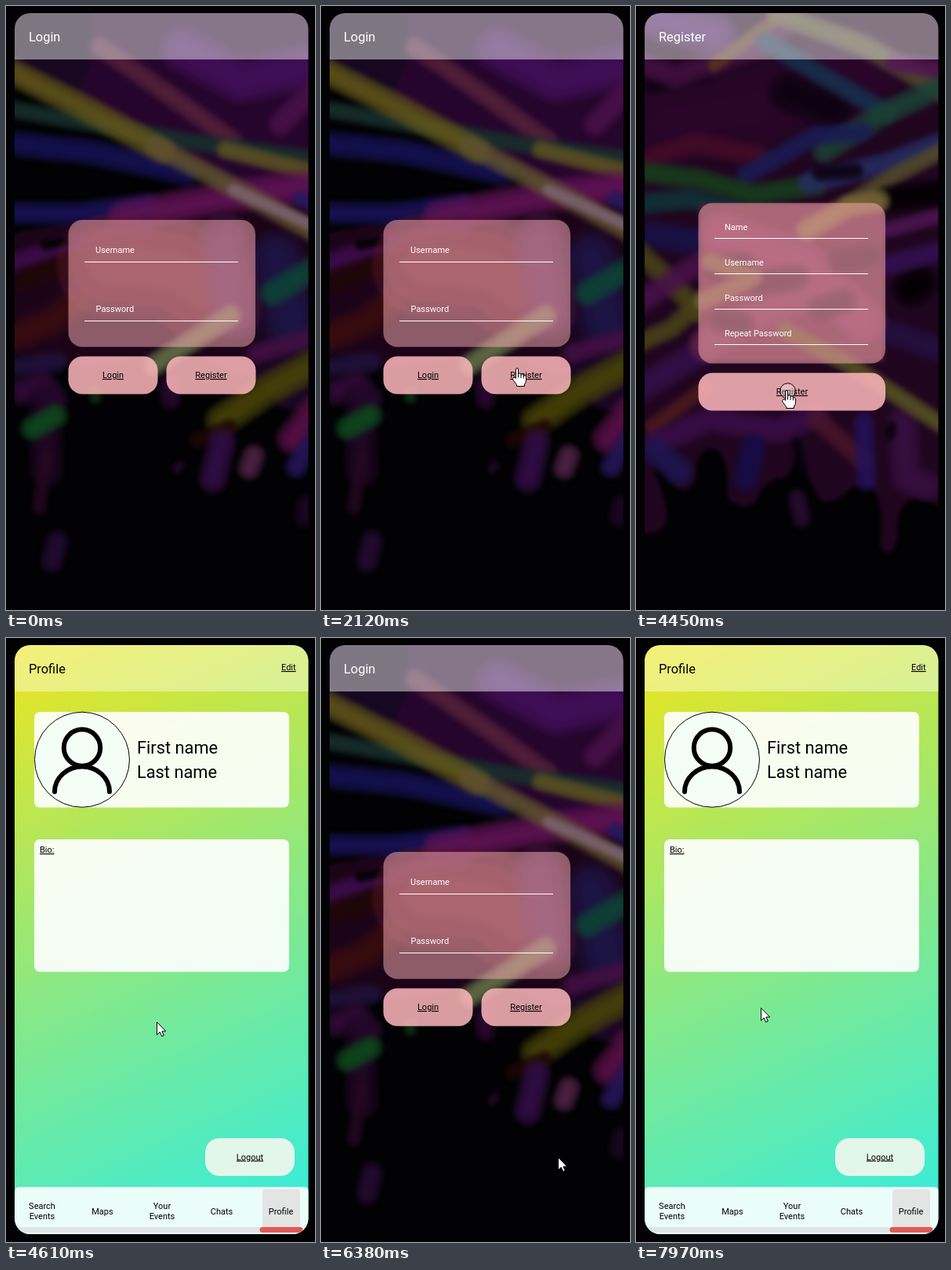
An HTML page that plays this animation: 394x768 px, repeating every 8000 ms.

```html
<!DOCTYPE html>
<html lang="en">
<head>
<meta charset="utf-8">
<title>App prototype</title>
<style>
  html, body { margin: 0; width: 100%; height: 100%; overflow: hidden; background: #020204; }
  svg { position: fixed; inset: 0; width: 100%; height: 100%; font: 11px Roboto, sans-serif; }
  .sky { position: fixed; }
  .paint { fill: none; stroke-linecap: round; stroke-linejoin: round; filter: url(#soft); }
  .title { font-size: 16.4px; }
  .dark { fill: #fff; }
  .glass { fill: #ffb2b8; fill-opacity: .5; }
  .button { fill: #ffb9be; fill-opacity: .85; }
  .header { fill: #fff; fill-opacity: .45; }
  .panel { fill: #fff; fill-opacity: .91; }
  .link { fill: #000; text-decoration: underline; }
  .mid { text-anchor: middle; }
  .rule { stroke: #fff; }
  .cursor { fill: #fff; stroke: #000; stroke-linejoin: round; }
</style>
</head>
<body>
<svg viewBox="0 0 394 768">
  <defs>
    <clipPath id="phone"><rect x="11" y="9" width="374.5" height="749" rx="20"/></clipPath>
    <filter id="soft" filterUnits="userSpaceOnUse" x="-20" y="-20" width="440" height="800" color-interpolation-filters="sRGB">
      <feGaussianBlur stdDeviation="2.6"/>
    </filter>
    <linearGradient id="lime" gradientUnits="userSpaceOnUse" x1="22" y1="-5" x2="374" y2="772">
      <stop stop-color="#efe51c"/><stop offset=".5" stop-color="#8ae884"/><stop offset="1" stop-color="#2fede4"/>
    </linearGradient>
  </defs>

  <g id="login" clip-path="url(#phone)">
    <g class="paint">
      <path fill="#25052b" d="M70 0H394V262L300 235L180 165L60 95Z"/>
      <path fill="#170720" d="M0 0H110V70L90 110L0 72Z"/>
      <path fill="#1c0418" d="M0 290L200 255L394 225V450L300 470L230 440L90 460L0 440Z"/>
      <path fill="#190622" d="M318 400L394 370V520L350 510L318 470Z"/>
      <path stroke="#42105a" stroke-width="46" d="M225 55L300 95L394 75"/>
      <path stroke="#4a1149" stroke-width="26" d="M350 150L394 105"/>
      <path stroke="#54203a" stroke-width="22" d="M120 52L215 118L290 172"/>
      <path stroke="#171154" stroke-width="28" d="M0 174L110 186L230 212"/>
      <path stroke="#18302c" stroke-width="20" d="M0 130L90 146L230 172L394 195"/>
      <path stroke="#5c5022" stroke-width="20" d="M280 183L394 212"/>
      <path stroke="#1b1258" stroke-width="24" d="M0 263L90 264L180 252"/>
      <path stroke="#5f1354" stroke-width="34" d="M150 268L270 244L394 228"/>
      <path stroke="#3c0c4c" stroke-width="22" d="M0 330L80 302L180 280"/>
      <path stroke="#62551c" stroke-width="28" d="M0 80L100 130L200 184"/>
      <path stroke="#605030" stroke-width="23" d="M190 178L300 236L394 288"/>
      <path stroke="#7b6170" stroke-width="14" d="M290 234L394 280"/>
      <path stroke="#1c1648" stroke-width="54" d="M345 320L365 405"/>
      <path stroke="#261a60" stroke-width="18" d="M375 245L394 255"/>
      <path stroke="#0d4436" stroke-width="28" d="M340 365L394 333"/>
      <path stroke="#390c10" stroke-width="32" d="M0 425L60 400L90 375"/>
      <path stroke="#210708" stroke-width="26" d="M20 350L75 330"/>
      <path stroke="#000" stroke-width="12" d="M50 304L78 298"/>
      <path stroke="#5c1b28" stroke-width="100" d="M130 330L210 335L250 360"/>
      <path stroke="#4a204e" stroke-width="54" d="M280 300L290 390"/>
      <path stroke="#65704a" stroke-width="24" d="M190 456L286 394"/>
      <path stroke="#22123c" stroke-width="22" d="M0 460L65 453"/>
      <path stroke="#421043" stroke-width="22" d="M320 442L394 420"/>
      <path stroke="#484308" stroke-width="34" d="M275 527L330 490L394 455"/>
      <path stroke="#310b39" stroke-width="30" d="M20 490L45 480L60 500"/>
      <path stroke="#220727" stroke-width="34" d="M50 500L52 590"/>
      <path stroke="#240820" stroke-width="16" d="M52 570L42 638"/>
      <path stroke="#0d4a1c" stroke-width="26" d="M34 537L63 521"/>
      <path stroke="#103014" stroke-width="14" d="M114 490V498"/>
      <path stroke="#2b0830" stroke-width="22" d="M208 480L210 500"/>
      <path stroke="#1e0805" stroke-width="18" d="M245 552L285 535"/>
      <path stroke="#350d48" stroke-width="30" d="M275 555L264 601"/>
      <path stroke="#512348" stroke-width="24" d="M316 572L310 588"/>
      <path stroke="#5a1048" stroke-width="34" d="M366 550L394 515"/>
      <path stroke="#25165a" stroke-width="24" d="M370 586L394 550"/>
      <path stroke="#240929" stroke-width="10" d="M222 584L218 589"/>
      <path stroke="#250b32" stroke-width="24" d="M65 681L59 706"/>
      <path stroke="#1c0824" stroke-width="22" d="M383 635L381 650"/>
    </g>
    <rect class="header" width="394" height="68"/>
    <text class="title dark" x="29" y="45">Login</text>
    <rect class="glass" x="79.5" y="272" width="238.5" height="161.500" rx="18"/>
    <path class="rule" d="M100 325.500H296M100 400.500H296"/>
    <text class="dark" x="114" y="314">Username</text>
    <text class="dark" x="114.500" y="389">Password</text>
    <rect class="button" x="79.500" y="445.500" width="114" height="48" rx="18"/>
    <rect class="button" x="204.500" y="445.500" width="114" height="48" rx="18"/>
    <text class="link mid" x="136.500" y="473">Login</text>
    <text class="link mid" x="261.500" y="473">Register</text>
  </g>

  <g id="register" clip-path="url(#phone)">
    <g class="paint">
      <path fill="#20051f" d="M0 0H394V640Q370 625 350 628Q332 632 333 680Q322 708 311 685Q318 635 300 610Q285 606 272 615Q252 635 236 629Q218 600 205 560Q200 605 180 600Q160 608 152 632Q130 645 116 622Q120 565 95 563Q75 565 77 600Q68 622 52 613Q30 585 20 585Q45 640 37 660Q25 675 0 668Z"/>
      <path stroke="#2a062b" stroke-width="80" d="M40 150L150 130L290 80"/>
      <path stroke="#0b0310" stroke-width="44" d="M195 110L250 130"/>
      <path stroke="#0e0314" stroke-width="20" d="M20 100L90 85"/>
      <path stroke="#42103f" stroke-width="26" d="M0 70L50 90L160 50L200 15"/>
      <path stroke="#4c1b62" stroke-width="44" d="M20 15L100 35"/>
      <path stroke="#58321e" stroke-width="16" d="M100 75L180 15"/>
      <path stroke="#16304b" stroke-width="22" d="M165 45L240 90L320 136"/>
      <path stroke="#544c2e" stroke-width="24" d="M180 10L290 50L394 110"/>
      <path stroke="#531653" stroke-width="22" d="M330 72L394 82"/>
      <path stroke="#1c4134" stroke-width="26" d="M240 185L310 140L394 100"/>
      <path stroke="#430b27" stroke-width="24" d="M0 200L75 174L155 190"/>
      <path stroke="#1a1c54" stroke-width="22" d="M140 215L230 165L290 160"/>
      <path stroke="#173d1d" stroke-width="24" d="M0 210L80 220L150 240L230 228"/>
      <path stroke="#103338" stroke-width="24" d="M0 252L70 245L130 262"/>
      <path stroke="#252c62" stroke-width="24" d="M220 225L320 200L394 172"/>
      <path stroke="#514a2a" stroke-width="20" d="M270 252L330 215L394 182"/>
      <path stroke="#0b0312" stroke-width="18" d="M235 213L280 210"/>
      <path stroke="#000" stroke-width="30" d="M322 246L394 236"/>
      <path stroke="#4b1450" stroke-width="18" d="M320 285L394 265"/>
      <path stroke="#171347" stroke-width="30" d="M20 290L80 300"/>
      <path stroke="#474216" stroke-width="24" d="M0 310L35 342L82 390"/>
      <path stroke="#471249" stroke-width="26" d="M0 380L60 340L130 300"/>
      <path stroke="#000" stroke-width="38" d="M350 360L362 352"/>
      <path stroke="#331052" stroke-width="24" d="M318 330L394 310"/>
      <path stroke="#230f40" stroke-width="28" d="M325 415L394 440"/>
      <path stroke="#494117" stroke-width="22" d="M0 430L45 410L90 370"/>
      <path stroke="#33104a" stroke-width="30" d="M0 490L65 450L120 420"/>
      <path stroke="#4c191d" stroke-width="18" d="M20 535L90 485"/>
      <path stroke="#3a0d46" stroke-width="28" d="M25 555L95 525L180 540L230 520"/>
      <path stroke="#1d1651" stroke-width="30" d="M25 565L55 592"/>
      <path stroke="#160d49" stroke-width="28" d="M150 560L140 600"/>
      <path stroke="#47152a" stroke-width="22" d="M230 525L290 578"/>
      <path stroke="#231259" stroke-width="22" d="M290 530L294 604"/>
      <path stroke="#371040" stroke-width="32" d="M340 530L345 600L370 610"/>
      <path stroke="#2a0c30" stroke-width="20" d="M206 626L211 652"/>
      <path stroke="#090310" stroke-width="12" d="M326 535L324 546M205 555L212 590"/>
      <path fill="#541c38" d="M82 252H316V452H82Z"/>
      <path stroke="#752b58" stroke-width="46" d="M110 290L210 325L290 400"/>
      <path stroke="#6c284e" stroke-width="36" d="M90 430L150 395L235 360"/>
      <path stroke="#32172c" stroke-width="28" d="M105 335L135 328M160 352L205 345M260 325L300 318M110 400L135 405M235 385L265 375"/>
      <path stroke="#7a6936" stroke-width="24" d="M218 285L270 255L310 248"/>
      <path stroke="#6d5b35" stroke-width="20" d="M85 375L150 345L95 325"/>
      <path stroke="#555021" stroke-width="20" d="M190 412L270 455L394 535"/>
    </g>
    <rect class="header" width="394" height="68"/>
    <text class="title dark" x="29" y="45">Register</text>
    <rect class="glass" x="79.500" y="250.500" width="238.500" height="204" rx="18"/>
    <path class="rule" d="M100 295.500H296M100 340.500H296M100 385.500H296M100 430.500H296"/>
    <g class="dark">
      <text x="113" y="285">Name</text>
      <text x="113" y="330">Username</text>
      <text x="113" y="375">Password</text>
      <text x="113" y="420">Repeat Password</text>
    </g>
    <rect class="button" x="79.500" y="466.500" width="238.500" height="48" rx="18"/>
    <text class="link mid" x="199" y="494">Register</text>
  </g>

  <g id="profile" clip-path="url(#phone)">
    <rect width="394" height="768" fill="url(#lime)"/>
    <rect width="394" height="68" fill="#fff" fill-opacity=".4"/>
    <text class="title" x="29" y="45">Profile</text>
    <text class="link" x="351" y="41">Edit</text>
    <rect class="panel" x="36" y="94" width="325" height="121.500" rx="7"/>
    <g fill="none" stroke="#000" stroke-linecap="round">
      <circle cx="97" cy="154.700" r="60.500" fill="#f4fdf5"/>
      <g stroke-width="6">
        <circle cx="97" cy="139.500" r="23.200"/>
        <path d="M62 195.500A35 32 0 0 1 132 195.500"/>
      </g>
    </g>
    <g font-size="21.800">
      <text x="167" y="147">First name</text>
      <text x="167" y="178">Last name</text>
    </g>
    <rect class="panel" x="36" y="256" width="325" height="168.500" rx="7"/>
    <text class="link" x="43" y="273">Bio:</text>
    <rect x="254" y="636" width="114" height="48" rx="18" fill="#e3f6ea"/>
    <text class="link mid" x="311" y="663.500">Logout</text>
    <path d="M11 758V704Q11 698 17 698H380Q386 698 386 704V758Z" fill="#ebfdf9"/>
    <rect x="327" y="701" width="48" height="52" rx="4" fill="#e3e5e5"/>
    <rect x="15" y="749" width="363" height="7" rx="3.500" fill="#dfe5e3"/>
    <rect x="323.500" y="749" width="55" height="7" rx="3.500" fill="#e05a55"/>
    <g class="mid">
      <text x="46" y="726">Search</text><text x="46" y="739">Events</text>
      <text x="123" y="733">Maps</text>
      <text x="199" y="726">Your</text><text x="199" y="739">Events</text>
      <text x="275" y="733">Chats</text>
      <text x="350.500" y="733">Profile</text>
    </g>
  </g>

  <g id="pointer" class="cursor">
    <circle id="ring" cx="1.500" cy="1.500" r="9.800" fill-opacity=".3"/>
    <path id="arrow" d="M.5.5V16.500L4.200 13L6.700 18.500L9.300 17.300L6.900 12H11.700Z"/>
    <g id="hand">
      <path d="M-1.500 13.500V2Q-1.500.5 0 .5T1.500 2V8.500Q1.500 7 3.200 7T5 8.500V9.500Q5 8 6.600 8T8.300 9.800V11Q8.500 9.500 9.900 9.700T11.500 11.500V16Q11.500 19 9.500 21V23.500H-.5V21.500L-5 15.500Q-6 13.500-4.800 12.700T-2.800 12.500Z"/>
      <path fill="none" d="M1.500 8V12.500M5 9.500V13M8.300 10.500V13.500"/>
    </g>
  </g>
</svg>
<script>
const LOOP = 8000;
const el = id => document.getElementById(id);

// Layer each brush stroke from wide and faint to narrow and strong.
for (const stroke of document.querySelectorAll('.paint path[stroke]')) {
  for (const [scale, opacity] of [[1.3, .4], [.95, .55], [.5, .6]]) {
    const layer = stroke.cloneNode();
    layer.setAttribute('stroke-width', stroke.getAttribute('stroke-width') * scale);
    layer.setAttribute('opacity', opacity);
    stroke.before(layer);
  }
  stroke.remove();
}

const screens = [[0, 'login'], [2550, 'register'], [4610, 'profile'], [6380, 'login'], [7970, 'profile']];

// Areas that turn the arrow into a hand: left, top, right, bottom.
const buttons = {
  login: [[80, 445, 193, 493], [204, 445, 318, 493]],
  register: [[80, 466, 318, 514]],
  profile: [[254, 636, 368, 684]],
};

// Pointer tip: time, x, y.
const moves = [
  [0, 420, 232], [1090, 383, 232], [1210, 323, 232], [1370, 215, 282],
  [1520, 172, 352], [1640, 143, 420], [1760, 130, 452], [1880, 152, 458], [2000, 205, 460], [2120, 250, 460],
  [2710, 250, 459], [3110, 242, 465], [3260, 208, 482], [3390, 188, 492],
  [3530, 186, 503], [3650, 188, 499], [3800, 192, 488],
  [5290, 200, 509], [5430, 218, 545], [5550, 248, 592], [5670, 278, 632], [5790, 293, 649], [5940, 302, 660],
  [6500, 284, 632], [6620, 258, 592], [6740, 235, 553],
  [6890, 216, 528], [7010, 197, 507], [7130, 182, 491], [7250, 173, 483],
  [7400, 164, 474], [7530, 160, 470], [7670, 159, 470],
];

const clicks = [[4450, 4610], [7830, 7970]];

const latest = (steps, time) => steps.findLast(step => step[0] <= time);
const show = (id, visible) => { el(id).style.display = visible ? '' : 'none'; };

function draw(now) {
  const time = now % LOOP;
  const screen = latest(screens, time)[1];
  const [, x, y] = latest(moves, time);
  const hovering = buttons[screen].some(([l, t, r, b]) => x >= l && x <= r && y >= t && y <= b);
  for (const id of ['login', 'register', 'profile']) show(id, id === screen);
  show('arrow', !hovering);
  show('hand', hovering);
  show('ring', clicks.some(([from, to]) => time >= from && time < to));
  el('pointer').setAttribute('transform', `translate(${x} ${y})`);
  requestAnimationFrame(draw);
}
draw(0);
</script>
</body>
</html>
```
